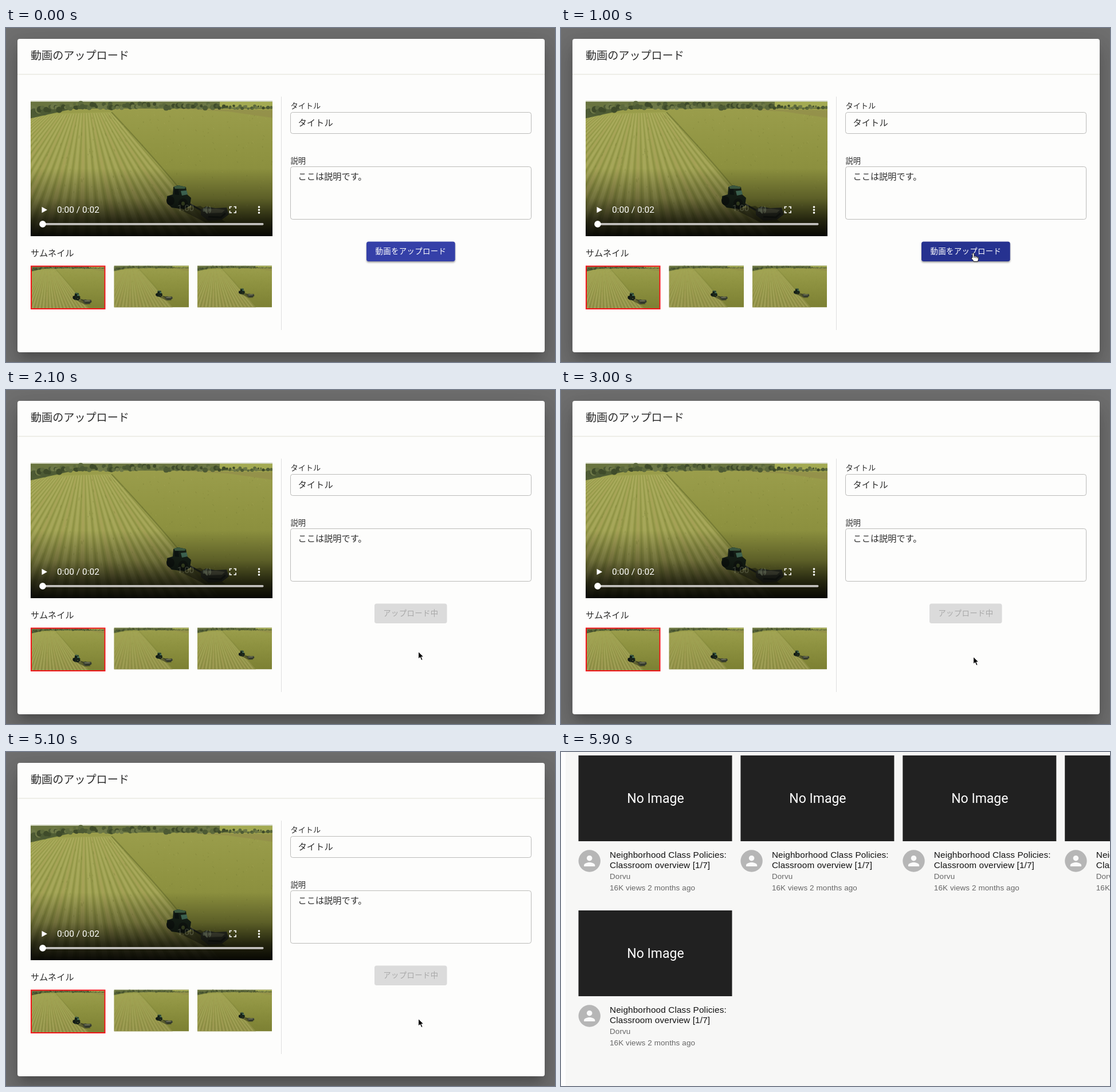
Write an HTML page that moves like this. It is 958x584 px and loops after 6.1 s.

```html
<!DOCTYPE html>
<html lang="ja">
<head>
<meta charset="utf-8">
<title>Upload dialog</title>
<style>
html, body { margin: 0; width: 958px; height: 584px; overflow: hidden; background: #6f6f6f; }
#panel {
  position: absolute; left: 20px; top: 19px; width: 920px; height: 548px;
  border-radius: 4px; background: #fdfdfc;
  box-shadow: 0 10.5px 14.4px -6.7px rgba(0,0,0,.2), 0 23px 36px 3px rgba(0,0,0,.12), 0 8.6px 44px 7.7px rgba(0,0,0,.1);
}
svg#stage { position: absolute; left: 0; top: 0; display: block; }
text { font-family: "Noto Sans CJK JP", "Noto Sans CJK", sans-serif; fill: #2b2b2b; }
.ui { font-family: Roboto, sans-serif; }
.card { font-family: "Liberation Sans", Arial, sans-serif; font-size: 15.3px; letter-spacing: .144px; fill: #111; }
.meta { font-size: 13.4px; fill: #666; }
.btn { font-size: 13.4px; letter-spacing: .36px; }
</style>
</head>
<body>
<div id="panel"></div>
<svg id="stage" width="958" height="584" viewBox="0 0 958 584"></svg>
<script>
const W = 958, H = 584, LOOP = 6100, STEP = 100;
const LIST_AT = 5200, FULL_AT = 5300, BUSY_AT = 1400;

let seed = 11;
const rnd = (a = 0, b = 1) => {
  seed = (seed * 16807) % 2147483647;
  return a + (b - a) * seed / 2147483647;
};
const pick = list => list[Math.floor(rnd(0, list.length))];
const n1 = v => v.toFixed(1);
const repeat = (n, fn) => Array.from({ length: n }, (_, i) => fn(i)).join('');
const rect = (x, y, w, h, fill, more = '') =>
  `<rect x="${x}" y="${y}" width="${w}" height="${h}" fill="${fill}" ${more}/>`;
const text = (x, y, size, str, more = '') =>
  `<text x="${x}" y="${y}" font-size="${size}" ${more}>${str}</text>`;

// Mown rows fan out from a point above the picture.
const VX = 94, VY = -35;
const rayX = (k, y) => VX + k * (y - VY);
function wedge(k, w, fill, opacity) {
  const pts = [[k, 20], [k + w, 20], [k + w, 240], [k, 240]];
  return `<polygon points="${pts.map(([s, y]) => n1(rayX(s, y)) + ',' + y).join(' ')}" fill="${fill}" opacity="${opacity}"/>`;
}

function rows() {
  let out = '';
  for (let k = -3, i = 0; k < .84; k += .076, i++) {
    out += wedge(k, .036, i % 3 ? '#b5b46a' : '#b4a864', .45);
    out += wedge(k + .048, .014, '#6c7330', .26);
  }
  return out;
}

const tufts = () => repeat(330, () => {
  const y = 24 + 215 * rnd() ** 1.3, x = rnd(0, 422);
  const k = (x - VX) / (y - VY), mown = k < .84;
  const len = mown ? rnd(2, 6) : rnd(1, 3);
  const dx = mown ? k * len : rnd(-1, 2);
  return `<path d="M${n1(x)} ${n1(y)}l${n1(dx)} ${n1(len)}" stroke="${pick(['#666c2a', '#b6b668', '#757c32', '#a0a150'])}" opacity=".35"/>`;
});

const trees = () => repeat(125, i => {
  const x = i * 3.4 + rnd(-2, 2);
  const left = Math.max(0, 1 - x / 75);
  const far = x > 328;
  const y = far ? rnd(9, 14) : rnd(5, 13) + left * rnd(0, 15);
  const r = far ? rnd(1.5, 3.2) : rnd(2.5, 5) + left * 2;
  return `<ellipse cx="${n1(x)}" cy="${n1(y)}" rx="${n1(r)}" ry="${n1(r * .95)}" fill="${pick(['#3f4b2a', '#4d5a34', '#5c693c', '#6d7847'])}"/>`;
});

const scene = `
  ${rect(0, 0, 422, 237, 'url(#grass)')}
  <path d="M0 24L141 20Q214 98 258 152L332 237H0Z" fill="url(#stubble)"/>
  <g filter="url(#soft)">
    <g clip-path="url(#mown)">${rows()}</g>
    <path d="M141 20Q214 98 258 152" fill="none" stroke="#5d6526" stroke-width="2.4" opacity=".5"/>
    <g fill="none" stroke-width=".9">${tufts()}</g>
  </g>
  ${rect(0, 0, 422, 14, '#69743f')}
  ${rect(330, 0, 92, 12, '#a3aa52')}
  ${rect(0, 0, 422, 2, '#d0d4bf')}
  <path d="M250 14L422 17V30L345 19Z" fill="#918a4b" opacity=".6"/>
  <path d="M0 13H80L0 31Z" fill="#4f5c34"/>
  <g filter="url(#soft)">${trees()}</g>`;

const tractor = `
  <path d="M240 180L262 190L296 184L340 212L305 213Z" fill="#2c3018" opacity=".55"/>
  <path d="M278 181L302 194" stroke="#262c22" stroke-width="3"/>
  <path d="M297 190l9-5 16 3 20-1 4 12-12 9-24 2-13-10z" fill="#3b4032"/>
  <path d="M302 190l22-1 15 2-5 5-27 1z" fill="#6a6d55"/>
  <path d="M310 203l22 1 8-7" fill="none" stroke="#242a22" stroke-width="3"/>
  <path d="M238 167l10-3 1-13 8-3 14 3 2 13 7 6-2 14-10 6-22-3-8-8z" fill="#1a261b"/>
  <path d="M250 150l8-2 13 3-2 3-17 0z" fill="#486a4c"/>
  <path d="M262 158l10-1 2 7-10 2z" fill="#4f7f68"/>
  <path d="M251 155l7 0 1 10-8-1z" fill="#0f1814"/>
  <ellipse cx="244" cy="175" rx="7" ry="8" fill="#111813"/>
  <ellipse cx="266" cy="180" rx="8" ry="9" fill="#141b15"/>
  <ellipse cx="266" cy="180" rx="3" ry="3.500" fill="#4e5d2e"/>`;

// The machine is placed relative to its spot in the large preview.
const view = (x, y, w, h, dx = 0, dy = 0, s = 1) => `
  <svg x="${x}" y="${y}" width="${w}" height="${h}" viewBox="0 0 422 237" preserveAspectRatio="none">
    <use href="#scene"/>
    <g transform="translate(${257 + dx} ${166 + dy}) scale(${s}) translate(-257 -166)"><use href="#tractor"/></g>
  </svg>`;

const controls = `
  ${rect(43, 127, 422, 237, 'url(#shade)')}
  <path d="M62.5 312.8L72 318L62.5 323.2Z" fill="#fff"/>
  ${text(89, 322.8, 15.5, '0:00 / 0:02', 'class="ui" style="fill:#fff"')}
  <g opacity=".25">
    ${text(299, 320, 15, '1.00', 'class="ui" style="fill:#c8d0b4"')}
    <path d="M344 315.500h3l4-4v13l-4-4h-3zM353 314q3 4 0 8M355 311q5.500 7 0 13" fill="#a9bd9c" stroke="#a9bd9c"/>
  </g>
  <path d="M390.500 316v-3.500h3.500M397.500 312.500h3.500v3.500M401 319.500v3.500h-3.500M394 323h-3.500v-3.500" fill="none" stroke="#fff" stroke-width="1.700"/>
  ${repeat(3, i => `<circle cx="441.5" cy="${313 + i * 5}" r="1.8" fill="#fff"/>`)}
  ${rect(62, 341, 387.5, 3.7, '#c3c1be', 'rx="1.8"')}
  <circle cx="64" cy="342.900" r="5.800" fill="#fff"/>`;

const frame = (y, h) => rect(496.5, y, 420, h, 'none', 'rx="3.8" stroke="#bbbbb9"');

const dialog = `
  ${text(43, 55, 19.1, '動画のアップロード')}
  ${rect(20, 80.5, 920, 1, '#dfe0d6')}
  ${rect(480, 120, 1, 408, '#dfdfdf')}
  ${view(43, 127, 422, 237)}
  ${controls}
  ${text(43, 398.8, 15.2, 'サムネイル')}
  ${view(44, 416, 129, 75)}
  ${rect(44, 416.5, 128.5, 74.5, 'none', 'stroke="#f3151b" stroke-width="2"')}
  ${view(188.5, 415.5, 130.5, 73, -4, -9, .88)}
  ${view(334, 415.5, 130, 73, -7, -22, .82)}
  ${text(496.5, 141, 13.2, 'タイトル')}
  ${frame(147.5, 37)}
  ${text(509.5, 171.2, 15.3, 'タイトル')}
  ${text(496.5, 237.2, 13.2, '説明')}
  ${frame(242.5, 92)}
  ${text(509.5, 265, 15.2, 'ここは説明です。')}
  <g id="ready">
    <rect id="face" x="629" y="373.5" width="154.700" height="34.500" rx="3.800" filter="url(#lift)"/>
    ${text(644.5, 395.4, 13.4, '動画をアップロード', 'class="btn" style="fill:#fff"')}
  </g>
  <g id="busy">
    ${rect(643, 373.5, 126.5, 34.5, '#dbdbdb', 'rx="3.8"')}
    ${text(658.3, 395.4, 13.4, 'アップロード中', 'class="btn" style="fill:#a9a9a9"')}
  </g>`;

const line = (y, str, cls = 'card') => `<text class="${cls}" x="54.500" y="${y}">${str}</text>`;
const card = (x, y) => `
  <g transform="translate(${x} ${y})">
    <rect class="thumb" width="268" height="150" fill="#212121"/>
    ${text(134.5, 83, 23, 'No Image', 'class="ui" text-anchor="middle" style="fill:#fff"')}
    <circle cx="19.200" cy="184.500" r="19.200" fill="#b6b6b6"/>
    <path transform="translate(4.800 170.100) scale(1.200)" fill="#fafafa" d="M12 12a4 4 0 1 0 0-8a4 4 0 0 0 0 8zm0 2c-2.670 0-8 1.340-8 4v2h16v-2c0-2.660-5.330-4-8-4z"/>
    ${line(179.3, 'Neighborhood Class Policies:')}
    ${line(197.4, 'Classroom overview [1/7]')}
    ${line(216.3, 'Dorvu', 'card meta')}
    ${line(235.6, '16K views 2 months ago', 'card meta')}
  </g>`;

const list = `
  ${rect(0, 0, W, H, '#f7f7f6')}
  ${rect(0, 0, 8, H, '#fdfdfd')}
  ${repeat(4, i => card(30.5 + i * 282.9, 6))}
  ${card(30.5, 277)}`;

const stage = document.getElementById('stage');
stage.innerHTML = `
  <defs>
    <linearGradient id="grass" x2="0" y2="1">
      <stop offset="0" stop-color="#9c9f4d"/><stop offset=".4" stop-color="#8f9341"/><stop offset="1" stop-color="#7c8033"/>
    </linearGradient>
    <linearGradient id="stubble" x2="0" y2="1">
      <stop offset="0" stop-color="#a1a552"/><stop offset=".5" stop-color="#979a4b"/><stop offset="1" stop-color="#8d8d45"/>
    </linearGradient>
    <linearGradient id="shade" x2="0" y2="1">
      <stop offset=".5" stop-color="#000" stop-opacity="0"/>
      <stop offset=".72" stop-color="#000" stop-opacity=".3"/>
      <stop offset=".88" stop-color="#000" stop-opacity=".72"/>
      <stop offset="1" stop-color="#000" stop-opacity=".94"/>
    </linearGradient>
    <clipPath id="mown"><path d="M0 30L90 22H141Q214 98 258 152L332 237H0Z"/></clipPath>
    <filter id="soft" x="0" y="0" width="100%" height="100%"><feGaussianBlur stdDeviation=".7"/></filter>
    <filter id="lift" x="-10%" y="-30%" width="120%" height="180%">
      <feDropShadow dx="0" dy="2" stdDeviation="1.600" flood-color="#000" flood-opacity=".38"/>
    </filter>
    <g id="scene">${scene}</g>
    <g id="tractor">${tractor}</g>
  </defs>
  <g id="dialog">${dialog}</g>
  <g id="list">${list}</g>
  <g id="pointer">
    <path id="arrow" d="M0 0V13.500L3.100 10.700L5.300 15.700L7.700 14.700L5.600 9.800H9.700Z" fill="#000" stroke="#fff" stroke-width="1.100"/>
    <path id="hand" d="M-1.500 1.500a1.500 1.500 0 0 1 3 0v4c1.600-.7 2.700-.2 2.900.7c1.300-.6 2.300 0 2.500.8c1.300-.3 2 .4 2 1.500v2.300c0 1.600-1 2.400-1.200 4.200h-7c-.5-1.800-2.200-3.200-3.700-5.300c-1-1.700.4-2.600 1.500-1.600z M1.500 5.500v3M4.400 6.500v2.300M6.900 7.300v2" fill="#fff" stroke="#111" stroke-width="1"/>
  </g>`;

const el = id => document.getElementById(id);
const show = (node, on) => { node.style.display = on ? '' : 'none'; };
const thumbs = stage.querySelectorAll('.thumb');

// time, x, y
const path = [
  [300, 752, 600], [900, 719.5, 393.5], [1400, 719.5, 393.5],
  [2000, 719.5, 457], [2300, 719.5, 457], [2800, 719.5, 466],
  [5600, 719.5, 466], [5700, 721, 471], [5800, 724, 488]
];
const ease = p => p * p * (3 - 2 * p);

function pointerAt(t) {
  const i = path.findIndex(k => k[0] > t);
  if (i === 0) return null;
  if (i < 0) return t < 5900 ? path[path.length - 1].slice(1) : null;
  const [t0, x0, y0] = path[i - 1], [t1, x1, y1] = path[i];
  const p = ease((t - t0) / (t1 - t0));
  return [x0 + (x1 - x0) * p, y0 + (y1 - y0) * p];
}

function draw(t) {
  t = Math.floor(t / STEP) * STEP;
  const listed = t >= LIST_AT, busy = t >= BUSY_AT;
  const pos = pointerAt(t);
  const hover = !busy && pos && pos[1] < 408;
  show(el('panel'), !listed);
  show(el('dialog'), !listed);
  show(el('list'), listed);
  show(el('ready'), !busy);
  show(el('busy'), busy);
  el('face').setAttribute('fill', hover ? '#283390' : '#3541a8');
  thumbs.forEach(r => r.setAttribute('height', t < FULL_AT ? 94.5 : 150));
  show(el('pointer'), pos);
  show(el('arrow'), !hover);
  show(el('hand'), hover);
  if (pos) el('pointer').setAttribute('transform', `translate(${n1(pos[0])} ${n1(pos[1])})`);
}

const start = performance.now();
function tick() {
  draw((performance.now() - start) % LOOP);
  requestAnimationFrame(tick);
}
tick();
</script>
</body>
</html>
```
